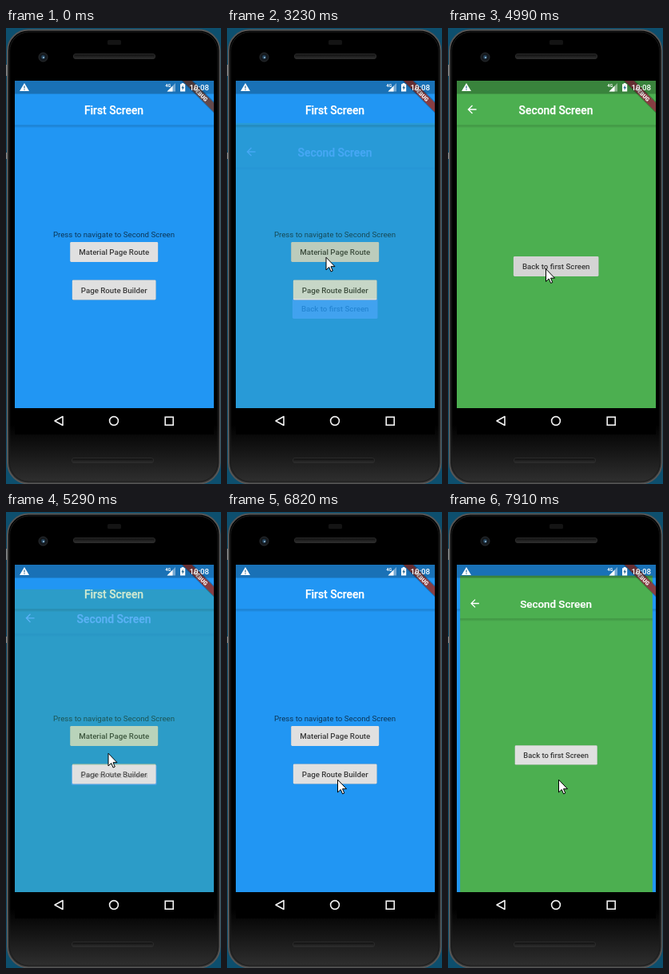
Write an HTML page that moves like this. It is 269 px wide and 571 px high and loops after 7.99 s.

```html
<!DOCTYPE html>
<html lang="en">
<head>
<meta charset="utf-8">
<title>Page route transitions</title>
<style>
  html, body { margin: 0; width: 100%; height: 100%; overflow: hidden; background: #0d4f6e; }
  svg { display: block; width: 269px; height: 571px; }
  text { font-family: Roboto, "Noto Sans", sans-serif; text-anchor: middle; }
  .title { font-size: 13.85px; font-weight: 500; fill: #fff; stroke: #fff; stroke-width: .25; }
  .label { font-size: 9.7px; font-weight: 500; fill: #3a3a3a; }
  .note { font-size: 9.7px; fill: rgba(0, 0, 0, .64); }
  .face { fill: #e0e0e0; filter: drop-shadow(0 .8px .7px rgba(0, 0, 0, .3)); }
  .nav { fill: none; stroke: #f2f2f2; stroke-width: 1.6; }
  .slot { fill: url(#slot); stroke: #2b2b2b; }
</style>
</head>
<body>
<svg viewBox="0 0 269 571">
  <defs>
    <clipPath id="screen"><rect x="11" y="66" width="249" height="410"/></clipPath>
    <linearGradient id="drop" x2="0" y2="1">
      <stop stop-opacity=".17"/>
      <stop offset="1" stop-opacity="0"/>
    </linearGradient>
    <linearGradient id="body" x2="0" y2="1">
      <stop offset=".87"/>
      <stop offset="1" stop-color="#303030"/>
    </linearGradient>
    <linearGradient id="slot" x2="0" y2="1">
      <stop stop-color="#0e0e0e"/>
      <stop offset="1" stop-color="#303030"/>
    </linearGradient>
  </defs>

  <!-- phone -->
  <rect width="269" height="571" fill="#0d4f6e"/>
  <path d="M0 46h2v14h-2zM0 156h2v8h-2z" fill="#8b8f92"/>
  <rect x="2" y="2.500" width="265.500" height="568" rx="26" fill="url(#body)" stroke="#565656" stroke-width="2"/>
  <rect x="4.500" y="5" width="260.500" height="563" rx="24" fill="none" stroke="#1d1d1d"/>
  <rect x="127" y="15" width="17" height="6" rx="1.500" fill="#141414"/>
  <rect class="slot" x="84.500" y="32.500" width="102" height="6" rx="2.500"/>
  <rect class="slot" x="82.500" y="538.500" width="102" height="6" rx="2.500"/>
  <circle cx="46.500" cy="36.500" r="5.500" fill="#15191d" stroke="#2b2e31"/>
  <circle cx="46.500" cy="36.500" r="2.400" fill="#25455f"/>
  <circle cx="47" cy="37" r="1" fill="#9fc4dc"/>
  <rect x="11" y="476" width="249" height="33"/>
  <path class="nav" d="M71 486.500V497.500L61 492Z" stroke-linejoin="round"/>
  <circle class="nav" cx="135" cy="492" r="5.400"/>
  <rect class="nav" x="199.200" y="487.200" width="10" height="10"/>

  <g clip-path="url(#screen)">
    <g id="first">
      <rect x="11" y="66" width="249" height="410" fill="#2196f3"/>
      <rect x="11" y="121.500" width="249" height="4" fill="url(#drop)"/>
      <text class="title" x="135" y="107.800">First Screen</text>
      <text class="note" x="135" y="262">Press to navigate to Second Screen</text>
    </g>

    <g id="second">
      <rect x="11" y="66" width="249" height="410" fill="#4caf50"/>
      <rect x="11" y="121.500" width="249" height="4" fill="url(#drop)"/>
      <path transform="translate(21.700 93.700) scale(.692)" fill="#fff"
        d="M20 11H7.830l5.590-5.590L12 4l-8 8 8 8 1.410-1.410L7.830 13H20z"/>
      <text class="title" x="135" y="107.800">Second Screen</text>
    </g>

    <!-- corner ribbon -->
    <g transform="translate(260 66) rotate(45)">
      <rect x="-42" y="18.400" width="84" height="10.300" fill="rgba(0,0,0,.25)"/>
      <rect id="ribbon" x="-42" y="19.400" width="84" height="8.300"/>
      <text y="26.100" font-size="7" font-weight="900" fill="#fff">DEBUG</text>
    </g>

    <!-- status bar -->
    <rect x="11" y="66" width="249" height="16.500" fill="rgba(0,0,0,.25)"/>
    <path d="M23 69L29 79H17Z" fill="#fff"/>
    <path d="M22.400 72.500h1.200v3h-1.200zM22.400 76.500h1.200v1.200h-1.200z" fill="#2b6a94"/>
    <text x="202.800" y="74" font-size="5.500" font-weight="700" fill="#fff">4G</text>
    <path d="M201.500 79.500H212V69Z" fill="#fff" opacity=".4"/>
    <path d="M201.500 79.500H208.500V72.500Z" fill="#fff"/>
    <path d="M218 70.200h1.700v-1.200h2.800v1.200h1.700v9.300h-6.200z" fill="#fff"/>
    <path d="M221.600 71.500l-2.300 3.700h1.400v2.800l2.300-3.900h-1.400z" fill="#2b6a94"/>
    <text x="241.700" y="78.200" font-size="9.700" font-weight="500" fill="#fff">10:08</text>
  </g>

  <circle id="splash" r="12"/>
  <path id="cursor" d="M.5.700V16.500L4.200 13L6.600 18.500L8.800 17.500L6.500 12.200H11.500Z"
    fill="#fff" stroke="#000"/>
</svg>

<script>
  const LOOP = 7990;
  const $ = id => document.getElementById(id);
  const clamp = v => Math.min(1, Math.max(0, v));
  const progress = (t, start, length) => clamp((t - start) / length);

  function add(parent, tag, attrs) {
    const el = document.createElementNS(parent.namespaceURI, tag);
    for (const k in attrs) el.setAttribute(k, attrs[k]);
    return parent.appendChild(el);
  }

  // The button is as wide as its label plus padding
  function button(page, top, label) {
    const face = add(page, "rect", { class: "face", y: top, height: 25, rx: 1.4 });
    const text = add(page, "text", { class: "label", x: 135.2, y: top + 16 });
    text.textContent = label;
    const width = text.getComputedTextLength() + 22;
    face.setAttribute("x", 135.2 - width / 2);
    face.setAttribute("width", width);
    return face;
  }

  const taps = [
    { at: 2550, hold: 800, face: button($("first"), 268, "Material Page Route") },
    { at: 4580, hold: 400, face: button($("second"), 286, "Back to first Screen") },
    { at: 6180, hold: 400, face: button($("first"), 315.5, "Page Route Builder") }
  ];

  // Each move glides the pointer on to a new place
  const home = [209, 556];
  const moves = [
    { from: 360, to: 850, x: 146, y: 282 },
    { from: 1250, to: 1560, x: 133, y: 299 },
    { from: 1560, to: 1810, x: 125, y: 292 },
    { from: 1810, to: 1990, x: 123.5, y: 286.5 },
    { from: 4110, to: 4430, x: 122, y: 301 },
    { from: 5060, to: 5290, x: 127.5, y: 301.5 },
    { from: 5610, to: 6030, x: 138, y: 334.5 }
  ];

  function pointer(t) {
    let [x, y] = home;
    for (const m of moves) {
      const k = progress(t, m.from, m.to - m.from);
      x += (m.x - x) * k;
      y += (m.y - y) * k;
    }
    return [x, y];
  }

  function bezier(x1, y1, x2, y2) {
    const axis = (a, b, s) => 3 * a * s * (1 - s) ** 2 + 3 * b * s * s * (1 - s) + s ** 3;
    return v => {
      let lo = 0, hi = 1;
      for (let i = 0; i < 24; i++) {
        const mid = (lo + hi) / 2;
        if (axis(x1, x2, mid) < v) lo = mid; else hi = mid;
      }
      return axis(y1, y2, lo);
    };
  }
  const easeIn = bezier(.42, 0, 1, 1);
  const fastOutSlowIn = bezier(.4, 0, .2, 1);

  function elasticInOut(u) {
    const t = 2 * u - 1;
    const wave = Math.sin((t - .1) * 5 * Math.PI) / 2;
    return t < 0 ? -(2 ** (10 * t)) * wave : 2 ** (-10 * t) * wave + 1;
  }

  // First visit fades upwards and back; the second grows from the bottom
  function showSecond(t) {
    const grow = progress(t, 6440, 2120);
    const rise = progress(t, 3140, 265) - progress(t, 5125, 300);
    const scale = grow ? Math.max(0, elasticInOut(grow)) : 1;
    const drop = grow ? 0 : 102.5 * (1 - fastOutSlowIn(rise));
    const alpha = grow ? 1 : easeIn(rise);
    const page = $("second");
    page.style.display = alpha > .001 && scale > .004 ? "" : "none";
    page.setAttribute("opacity", alpha);
    page.setAttribute("transform",
      `translate(135.5 ${476 + drop}) scale(${scale}) translate(-135.5 -476)`);
  }

  function showTaps(t) {
    let glow = 0;
    for (const { at, hold, face } of taps) {
      const press = progress(t, at, 200) - progress(t, at + hold, 200);
      const grey = 224 - 13 * press;
      face.style.fill = `rgb(${grey}, ${grey}, ${grey})`;
      if (t >= at) glow = .12 * (1 - progress(t, at, 300));
    }
    $("splash").style.opacity = glow;
  }

  function draw(t) {
    const place = `translate(${pointer(t).join(" ")})`;
    $("cursor").setAttribute("transform", place);
    $("splash").setAttribute("transform", place);
    $("cursor").style.display = t < 360 ? "none" : "";
    $("ribbon").setAttribute("fill", t < 2700 ? "#63494c" : "#873d42");
    showSecond(t);
    showTaps(t);
  }

  const start = performance.now();
  function frame() {
    draw((performance.now() - start) % LOOP);
    requestAnimationFrame(frame);
  }
  frame();
</script>
</body>
</html>
```
